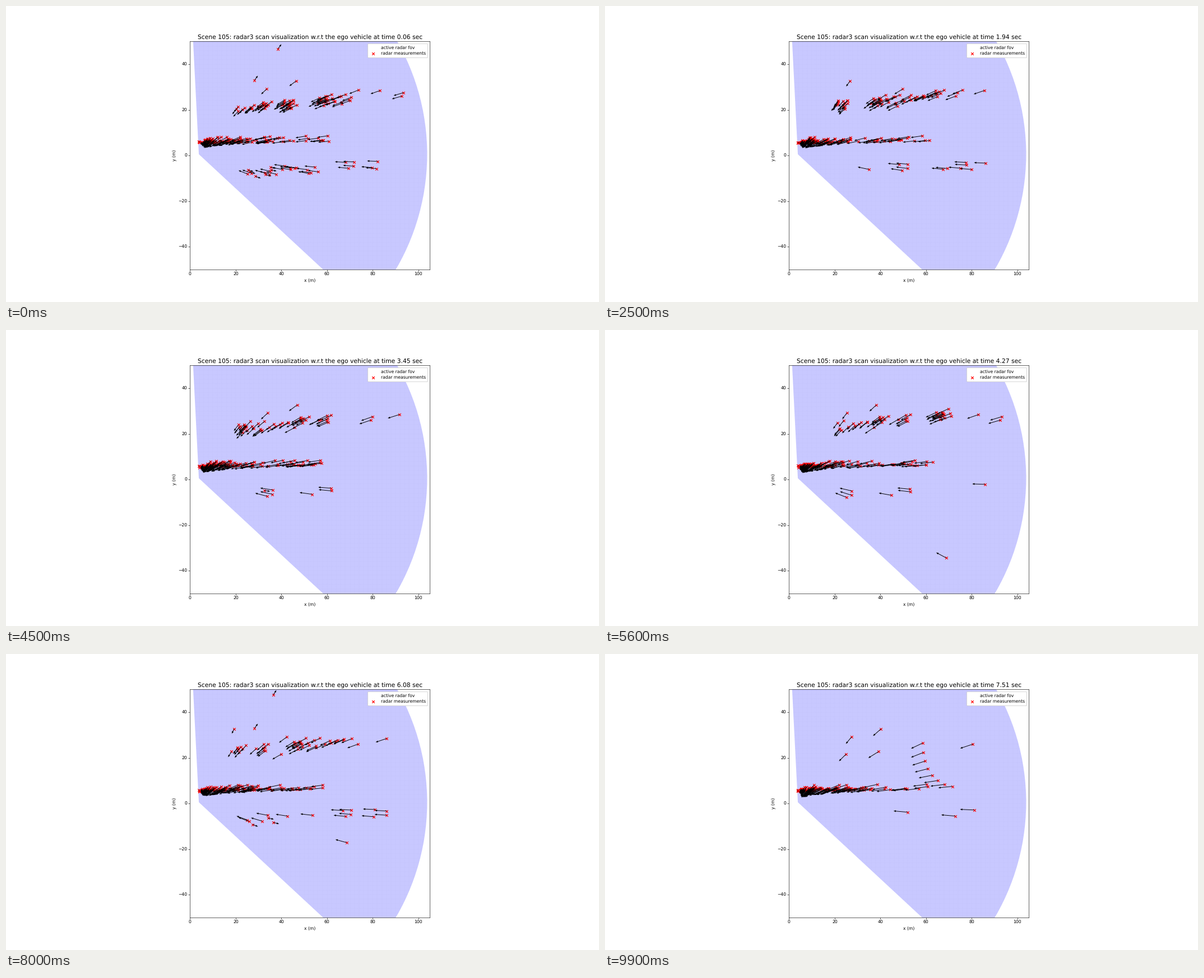
A matplotlib script that plays this animation: 1058x529 px, repeating every 10000 ms.

```python
import numpy as np
import matplotlib.pyplot as plt
from matplotlib.animation import FuncAnimation
from matplotlib.patches import Wedge

W, H = 1058, 529
FIG_W, FIG_H = 19.2, 9.6
DPI = W / FIG_W + 1e-7  # margin keeps the pixel size from rounding down
FRAMES, STEP_MS = 100, 100
SENSOR = np.array([3.85, 0.55])
FOV = (-42.9, 92.9)
REACH = 100
ROLL = 0.79      # metres driven per scan
AWAY_LEN = 2.5   # arrow length of receding echoes


def clock(frame):
    return 0.063 + 0.0752 * frame


def arrow_speed(frame):
    return np.interp(frame, [0, 16, 40, 66, 80, 99], [4.7, 4.9, 5.6, 5.7, 5.3, 6.2])


def flow(x, lo, hi, frame):
    """Drift towards the vehicle and re-enter at the far end."""
    return lo + (x - lo - ROLL * frame) % (hi - lo)


def chosen(rng, n, count):
    """Mask that keeps about count of n echoes, always the same ones first."""
    return rng.permutation(n) < round(float(count))


def guard_rail(frame):
    rng = np.random.default_rng(9000 + frame)
    x = np.concatenate([5 + rng.exponential(8, 80), rng.uniform(15, 63, 30)])
    x = x[x < 64]
    spread = 1.1 * np.clip((x - 3) / 6, 0.2, 1)
    y = 5.5 + 0.012 * x + np.minimum(np.abs(rng.normal(0, 1, len(x))), 2.2) * spread
    bumper = np.column_stack([rng.normal(4, 0.12, 4), rng.uniform(5.2, 6.1, 4)])
    return np.vstack([np.column_stack([x, y]), bumper])


def tree_line(frame):
    rng = np.random.default_rng(21)
    centres = np.repeat([23, 30.5, 43, 60, 68], [8, 13, 18, 20, 7])
    n = len(centres)
    x = flow(centres + rng.normal(0, 2.4, n), 20, 72, frame)
    rise = np.interp(frame, [0, 20, 45, 66, 80], [0, 1.7, 2.3, 4.5, 3])
    y = 18.5 + 0.1 * x + rise + np.clip(rng.normal(0, 1.2, n), -2.4, 2.4)
    count = np.interp(frame, [0, 16, 34, 84, 97], [66, 66, 45, 38, 0])
    return np.column_stack([x, y])[chosen(rng, n, count)]


def outliers(frame):
    """Few echoes far ahead of and around the tree line."""
    rng = np.random.default_rng(4)
    far = np.column_stack([flow(rng.uniform(72, 94, 4), 72, 94, frame),
                           rng.normal(28.5, 1.5, 4)])
    side = np.column_stack([flow(rng.uniform(14, 50, 4), 14, 50, frame),
                            rng.uniform(15, 33, 4)])
    return np.vstack([far[:max(0, 4 - frame // 30)], side])


def right_side(frame):
    rng = np.random.default_rng(33)
    n = 30
    x = flow(25 + 62 * rng.uniform(0, 1, n) ** 1.3, 25, 87, frame)
    y = -7.5 + 0.05 * (x - 30) + rng.normal(0, 1.5, n)
    count = np.interp(frame, [0, 16, 34, 66, 80, 99], [30, 16, 8, 6, 17, 3])
    return np.column_stack([x, y])[chosen(rng, n, count)]


def closing_wall(frame):
    """Curved row of echoes that replaces the tree line at the end."""
    s = np.linspace(0, 1, 8)[:max(0, frame - 91)]
    x = 58.5 + 13 * (1 - s) ** 2 + ROLL * (FRAMES - 1 - frame)
    return np.column_stack([x, 7.5 + 19 * s ** 1.6])


def deep_echo(frame):
    rng = np.random.default_rng(70 + frame)
    n = int(rng.uniform() < 0.15)
    return np.column_stack([rng.uniform(50, 70, n), rng.uniform(-36, -12, n)])


def movers(frame):
    """Two receding echoes high on the left that come and go."""
    found = []
    for x, y, period, shown in [(38.5, 46.8, 66, 20), (28.2, 33, 80, 10)]:
        age = frame % period
        if age < shown:
            found.append((x - 0.15 * age, y + 0.06 * age))
    return np.array(found).reshape(-1, 2)


def scan(frame):
    """Positions and arrow vectors of all echoes in one scan."""
    right, away = right_side(frame), movers(frame)
    receding = (right[:, 0] < 40) & (np.floor(right[:, 1] * 10) % 4 == 0)
    layers = [guard_rail(frame), tree_line(frame), outliers(frame),
              closing_wall(frame), deep_echo(frame), right[~receding]]
    toward = np.vstack(layers)
    away = np.vstack([away, right[receding]])
    pos = np.vstack([toward, away])
    is_away = np.arange(len(pos)) >= len(toward)

    ray = pos - SENSOR
    dist = np.hypot(*ray.T)
    angle = np.degrees(np.arctan2(ray[:, 1], ray[:, 0]))
    ok = (dist < REACH) & (angle > FOV[0]) & (angle < FOV[1] + 3)
    unit = ray[ok] / dist[ok, None]
    length = np.where(is_away[ok], AWAY_LEN, -arrow_speed(frame) * unit[:, 0])
    return pos[ok], unit * length[:, None]


plt.rcParams["text.hinting"] = "none"
fig, ax = plt.subplots(figsize=(FIG_W, FIG_H), dpi=DPI)
ax.set_aspect("equal")
ax.set_xlim(0, 105)
ax.set_ylim(-50, 50)
ax.set_xlabel("x (m)")
ax.set_ylabel("y (m)")
title = ax.set_title("", fontsize=14)

fov = Wedge(SENSOR, REACH, *FOV, facecolor="#c8c8ff", edgecolor="none", zorder=0)
ax.add_patch(fov)
mesh = dict(colors="#b4b4f2", linewidth=0.6, linestyles="dotted", alpha=0.45, zorder=0.5)
for lines in (ax.vlines(np.arange(2, 105, 2), -50, 50, **mesh),
              ax.hlines(np.arange(-48, 50, 2), 0, 105, **mesh)):
    lines.set_clip_path(fov)

ax.scatter([], [], alpha=0, label="active radar fov")
marks = ax.scatter([], [], marker="x", color="red", zorder=2,
                   label="radar measurements")
ax.legend(loc="upper right", framealpha=1, labelspacing=0.4)
arrows = []


def update(frame):
    while arrows:
        arrows.pop().remove()
    pos, vec = scan(frame)
    marks.set_offsets(pos)
    arrows.append(ax.quiver(*pos.T, *vec.T, color="black", angles="xy",
                            scale_units="xy", scale=1, units="dots", width=0.95,
                            headwidth=3.4, headlength=4.4, headaxislength=4.4,
                            zorder=2.2))
    title.set_text("Scene 105: radar3 scan visualization w.r.t the ego vehicle "
                   f"at time {clock(frame):.2f} sec")
    return marks, title, *arrows


anim = FuncAnimation(fig, update, frames=FRAMES, interval=STEP_MS,
                     init_func=lambda: update(0), repeat=True, repeat_delay=0)
plt.show()
```
